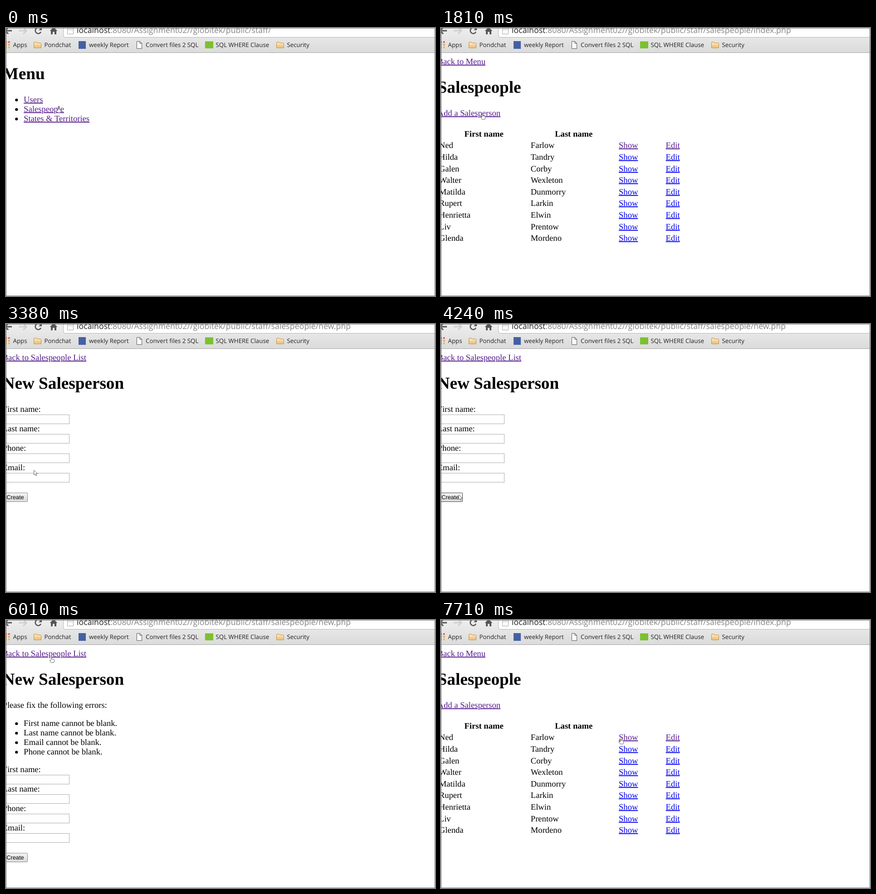
An HTML page that plays this animation: 946x592 px, repeating every 8 s.

```html
<!DOCTYPE html>
<html lang="en">
<head>
<meta charset="utf-8">
<title>Staff menu</title>
<style>
  html, body { margin: 0; width: 100%; height: 100%; overflow: hidden; background: #fff; }
  svg { display: block; width: 946px; height: 592px; }
  text { font: 18.6px "Liberation Serif", serif; white-space: pre; text-rendering: geometricPrecision; }
  .h1 { font-size: 37.2px; font-weight: bold; }
  .th { font-weight: bold; }
  .link { fill: #00e; text-decoration: underline; text-decoration-thickness: 1px; text-decoration-skip-ink: none; }
  .seen { fill: #551a8b; }
  .link.down { fill: #e00; }
  .box { fill: #fff; stroke: #ababab; }
  .button { fill: url(#face); stroke: #8b8b8b; }
  .button.over { stroke: #444; }
  .button.down { fill: #dcdcdc; }
  .label { font: 12.8px "Liberation Sans", sans-serif; }
  #url { font: 17.75px "Open Sans", sans-serif; fill: #858585; }
  .mark { font: 13.3px "Open Sans", sans-serif; fill: #222; }
  .cursor { fill: #fff; stroke: #555; stroke-width: .9; stroke-linejoin: round; }
</style>
</head>
<body>
<svg viewBox="0 0 946 592">
  <defs>
    <linearGradient id="bar" x2="0" y2="1"><stop stop-color="#eee"/><stop offset="1" stop-color="#dbdbdb"/></linearGradient>
    <linearGradient id="face" x2="0" y2="1"><stop stop-color="#f4f4f4"/><stop offset="1" stop-color="#dadada"/></linearGradient>
    <linearGradient id="tan" x2="0" y2="1"><stop stop-color="#fbe3b4"/><stop offset="1" stop-color="#efbf73"/></linearGradient>
    <g id="folder">
      <path d="M.5 13.5V2.5Q.5 .5 2 .5H6L8 2.5H14.5Q16.5 2.5 16.5 4.5V13.5Z" fill="url(#tan)" stroke="#bf9150"/>
      <path d="M1 5H16" stroke="#fdf0d0"/>
    </g>
  </defs>

  <g id="chrome">
    <rect width="946" height="54" fill="url(#bar)"/>
    <path d="M0 54.5H946" stroke="#a3a3a3"/>
    <path d="M126.5-4V17Q126.5 20.5 130 20.5H950V-4Z" fill="#fff" stroke="#b4b4b4"/>
    <g fill="none" stroke="#555" stroke-width="3">
      <path d="M13 6H0M5-1L-2 6L5 13"/>
      <path d="M28 6H44M38-1L45 6L38 13" stroke="#cfcfcf"/>
      <path d="M77 8.5A6.500 6.500 0 1 1 75.5 1" stroke-width="2.6"/>
    </g>
    <path d="M79-2V5H72Z M96.5 6.5L105-2L113.5 6.5H111V14H107V8.5H103V14H99V6.5Z" fill="#555"/>
    <path d="M135.5-3V13.5H148.5V-3Z" fill="#fafafa" stroke="#aaa"/>
    <path d="M136 3H148" stroke="#ddd" stroke-width="3"/>
    <g stroke-width="3.4">
      <path d="M0 31H2M5 31H8.4" stroke="#d9503f"/>
      <path d="M0 37H2M5 37H8.4" stroke="#e8963a"/>
      <path d="M0 43H2M5 43H8.4" stroke="#e9b23c"/>
    </g>
    <use href="#folder" x="61" y="30.5"/>
    <use href="#folder" x="596" y="30.5"/>
    <rect x="160" y="29" width="16" height="17" fill="#4460a4"/>
    <path d="M288.5 29.5H295L299.5 34V45.5H288.5Z M295 29.5V34H299.5" fill="#fff" stroke="#555"/>
    <rect x="439" y="29.5" width="18" height="15.5" fill="#7cc02f"/>
    <text class="mark" x="15.5" y="42">Apps</text>
    <text class="mark" x="84.5" y="42">Pondchat</text>
    <text class="mark" x="183" y="42">weekly Report</text>
    <text class="mark" x="308" y="42">Convert files 2 SQL</text>
    <text class="mark" x="462.5" y="42">SQL WHERE Clause</text>
    <text class="mark" x="619.5" y="42">Security</text>
    <text id="url" x="156" y="11"><tspan fill="#222">localhost</tspan>:8080/Assignment02//globitek/public/staff/<tspan id="path"></tspan></text>
  </g>

  <g id="pages"></g>
  <rect x=".5" y=".5" width="945" height="591" fill="none" stroke="#808080"/>

  <g id="pointer">
    <path class="cursor" id="arrow" d="M.5 .5V11L3 8.7L4.8 12.5L6.7 11.7L5 8H8.5Z"/>
    <path class="cursor" id="hand" d="M-1 7.5V1.2Q0-.2 1 1.2V5L5 5.8Q6 6 6 7.5V10L5 13H-1L-4 8.8Q-4 7-2.5 7.6L-1 9"/>
    <path id="beam" d="M-3-5H3M0-5V5M-3 5H3" fill="none" stroke="#555" stroke-width=".9"/>
  </g>
</svg>

<script>
const $ = id => document.getElementById(id);
const LEFT = -7.4, ITEM = 39.1;

const text = (s, x, y, cls = '') => `<text x="${x}" y="${y}" class="${cls}">${s}</text>`;
const link = (s, x, y, seen = true) => text(s, x, y, seen ? 'link seen' : 'link');
const title = (s, y) => text(s, LEFT, y, 'h1');
const rect = (x, y, w, h, cls, r = 0) =>
  `<rect x="${x}" y="${y}" width="${w}" height="${h}" rx="${r}" class="${cls}"/>`;
const list = (items, y, draw) => items.map((s, i) =>
  `<circle cx="23.2" cy="${y - 5 + 21 * i}" r="3.1"/>` + draw(s, ITEM, y + 21 * i)).join('');

const form = y => ['First name:', 'Last name:', 'Phone:', 'Email:'].map((s, i) =>
    text(s, LEFT, y + 43 * i) + rect(-8.5, y + 6.5 + 43 * i, 148, 20, 'box')).join('')
  + rect(-8.5, y + 179, 56, 19.5, 'button', 1) + text('Create', 1.2, y + 193.3, 'label');

const people = `Ned Farlow,Hilda Tandry,Galen Corby,Walter Wexleton,Matilda Dunmorry,
Rupert Larkin,Henrietta Elwin,Liv Prentow,Glenda Mordeno`.split(',').map(s => s.trim().split(' '));

const table = text('First name', 51.5, 240, 'th') + text('Last name', 251.2, 240, 'th')
  + people.map(([first, last], i) => {
    const y = Math.round(265.3 + 25.6 * i);
    return text(first, -4.2, y) + text(last, 197.8, y) + link('Show', 392, y, !i) + link('Edit', 495.6, y, !i);
  }).join('');

const newTop = link('Back to Salespeople List', LEFT, 80) + title('New Salesperson', 143);
const errors = ['First name', 'Last name', 'Email', 'Phone'].map(s => s + ' cannot be blank.');

const pages = [
  ['', title('Menu', 113) + list(['Users', 'Salespeople', 'States &amp; Territories'], 164, link)],
  ['salespeople/index.php', link('Back to Menu', LEFT, 80) + title('Salespeople', 143)
    + link('Add a Salesperson', LEFT, 194) + table],
  ['salespeople/new.php', newTop + form(194)],
  ['salespeople/new.php', newTop + text('Please fix the following errors:', LEFT, 194)
    + list(errors, 234, text) + form(336)]
];

// [time, page, time until the pointer notices the new page]
const visits = [[0, 0, 0], [580, 1, 980], [2380, 2, 2680], [4790, 3, 0], [6750, 1, 6880]];
// [start, steps, ms per step, x, y]
const moves = [[1380, 4, 143, 91.5, 189], [2970, 5, 132, 57.5, 338], [3780, 4, 153, 38.5, 377],
  [5380, 4, 126, 110, 62], [5884, 2, 126, 100.5, 81], [6880, 1, 1, 103, 81], [7160, 5, 137, 396.5, 261]];
const presses = [[150, 300], [2250, 2380], [4520, 4650], [6460, 6600]];

$('pages').innerHTML = pages.map(p => `<g>${p[1]}</g>`).join('');
const groups = [...$('pages').children];
const targets = groups.map(g => [...g.querySelectorAll('.link, .box, .button')].map(el => ({
  el, box: el.getBBox(),
  kind: el.matches('.link') ? 'hand' : el.matches('.box') ? 'beam' : 'arrow'
})));

function pointerAt(t) {
  let x = 115, y = 174;
  for (const [start, n, dt, toX, toY] of moves) {
    if (t < start) break;
    const f = Math.min(n, Math.floor((t - start) / dt) + 1) / n;
    const ease = f * f * (3 - 2 * f);
    x += (toX - x) * ease;
    y += (toY - y) * ease;
  }
  return [x, y];
}

const inside = (b, x, y) => x >= b.x && x <= b.x + b.width && y >= b.y && y <= b.y + b.height;

function draw(t) {
  const [, page, wait] = visits.filter(v => v[0] <= t).pop();
  const [x, y] = pointerAt(t);
  const hit = targets[page].find(o => inside(o.box, x, y));
  const pressed = presses.some(([a, b]) => t >= a && t < b);
  const kind = t < wait ? 'hand' : hit ? hit.kind : 'arrow';

  groups.forEach((g, i) => g.style.display = i === page ? '' : 'none');
  for (const o of targets[page]) {
    o.el.classList.toggle('over', o === hit);
    o.el.classList.toggle('down', o === hit && pressed);
  }
  $('path').textContent = pages[page][0];
  $('pointer').setAttribute('transform', `translate(${x} ${y})`);
  for (const k of ['arrow', 'hand', 'beam']) $(k).style.display = k === kind ? '' : 'none';
}

function tick() {
  draw(performance.now() % 8000);
  requestAnimationFrame(tick);
}
tick();
</script>
</body>
</html>
```
